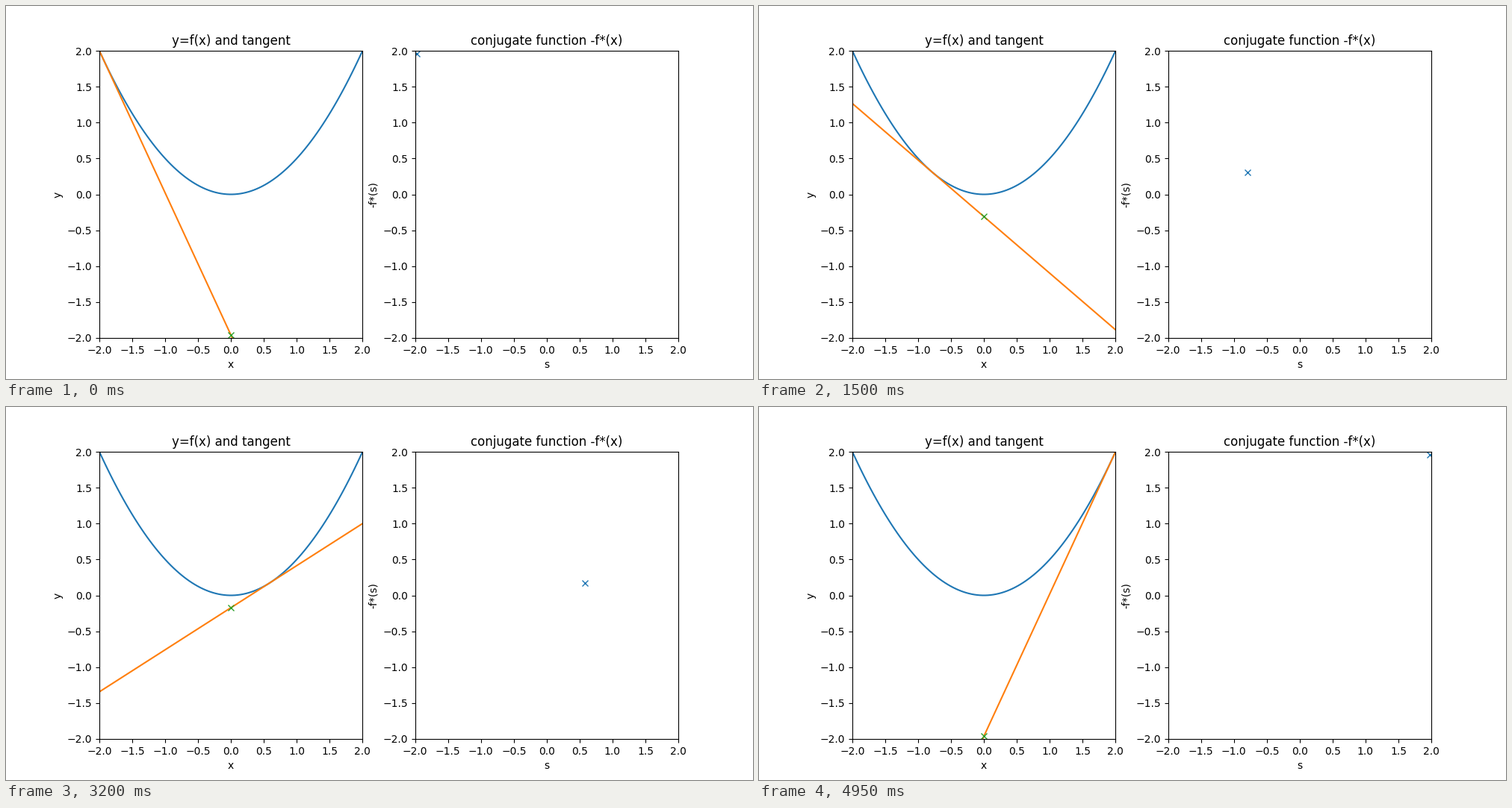
A matplotlib script for the animation above (5000 ms loop, 1000 by 500 pixels).

```python
import matplotlib.pyplot as plt
import numpy as np
from matplotlib.animation import FuncAnimation

FRAMES = 100
INTERVAL = 50

x = np.linspace(-2, 2, FRAMES)
y = x ** 2 / 2
slopes = np.gradient(y, x)  # one-sided differences at both ends
intercepts = y - slopes * x

plt.rcParams["font.family"] = "DejaVu Sans"
fig, (left, right) = plt.subplots(1, 2, figsize=(10, 5), dpi=100)


def style(ax, title, xlabel, ylabel):
    ax.set(title=title, xlabel=xlabel, ylabel=ylabel, xlim=(-2, 2), ylim=(-2, 2))
    ticks = np.arange(-2, 2.1, 0.5)
    ax.set_xticks(ticks)
    ax.set_yticks(ticks)


style(left, "y=f(x) and tangent", "x", "y")
style(right, "conjugate function -f*(x)", "s", "-f*(s)")

left.plot(x, y, color="C0")
tangent, = left.plot([], [], color="C1")
crossing, = left.plot([], [], "x", color="C2")
conjugate, = right.plot([], [], "x", color="C0")


def update(i):
    slope, intercept = slopes[i], intercepts[i]
    tangent.set_data(x, slope * x + intercept)
    crossing.set_data([0], [intercept])
    conjugate.set_data([slope], [-intercept])
    return tangent, crossing, conjugate


anim = FuncAnimation(fig, update, frames=FRAMES, interval=INTERVAL,
                     repeat=True, repeat_delay=0, blit=False)

plt.show()
```
